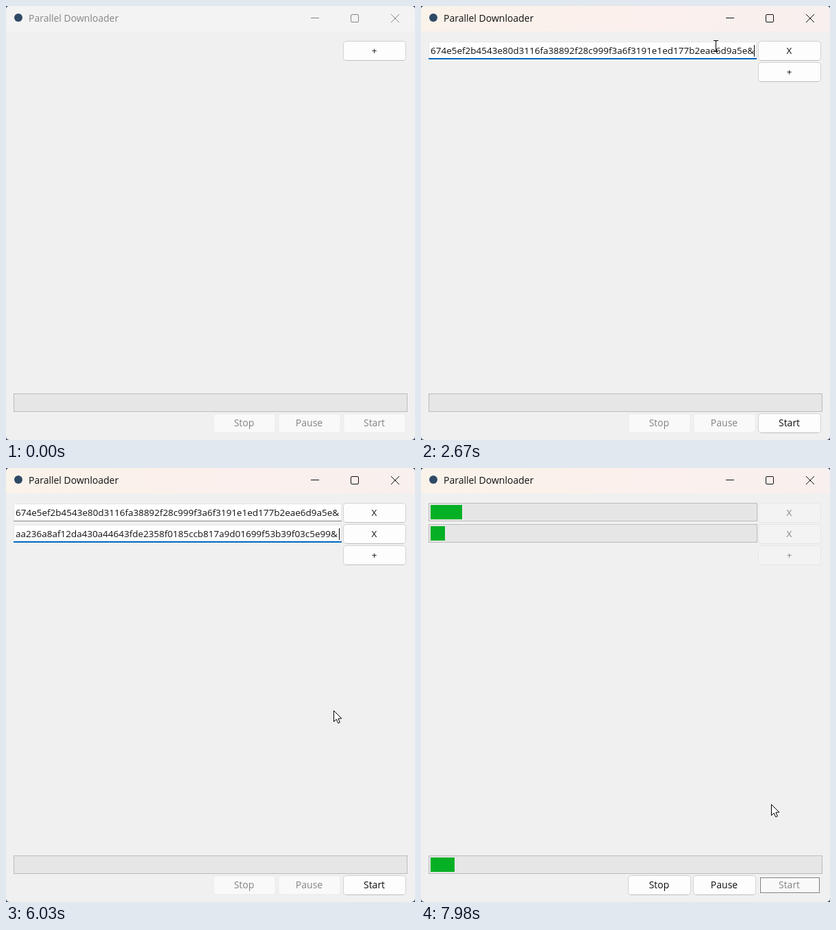
Write an HTML page with a canvas that moves like this. It is 597 px wide and 634 px high and loops after 8 s.

```html
<!DOCTYPE html>
<html lang="en">
<head>
<meta charset="utf-8">
<title>Parallel Downloader</title>
<style>
  html, body { margin: 0; width: 100%; height: 100%; overflow: hidden; background: #f0f0f0; }
  canvas { display: block; width: 597px; height: 634px; }
</style>
</head>
<body>
<canvas id="stage" width="597" height="634"></canvas>
<script>
const ctx = document.getElementById('stage').getContext('2d');
const W = 597, H = 634, LOOP = 8000;
const FONT = '"Open Sans", "Noto Sans", sans-serif';
const ROWS = [51, 82, 113];
const LINKS = [
  '674e5ef2b4543e80d3116fa38892f28c999f3a6f3191e1ed177b2eae6d9a5e&',
  'aa236a8af12da430a44643fde2358f0185ccb817a9d01699f53b39f03c5e99&'
];

// Pointer visits: [time, x, y]; the pointer is absent between them.
const VISITS = [
  [[630, 596, 80], [1190, 536, 66], [1510, 536, 66], [1630, 501, 61],
   [1800, 466, 58], [2180, 430, 58], [2670, 430, 58], [2860, 442, 220], [3050, 470, 604]],
  [[3850, 596, 104], [4200, 530, 99], [4460, 530, 99], [4710, 491, 97],
   [4960, 440, 94], [5500, 440, 94], [6030, 478, 353], [6290, 524, 565],
   [6360, 524, 565], [6600, 536, 607], [6880, 536, 607], [7150, 516, 545],
   [7500, 511, 491], [8000, 511, 491]]
];
const PRESSES = [[1380, 1500], [2210, 2340], [4300, 4440], [5000, 5130], [6690, 6810]];

const within = (t, a, b) => t >= a && t < b;

// Hermite interpolation that comes to rest beside standing segments.
function along(path, t) {
  const i = path.findIndex((p, k) => k + 1 < path.length && within(t, p[0], path[k + 1][0]));
  if (i < 0) return null;
  const [a, b] = [path[i], path[i + 1]];
  const d = b[0] - a[0], u = (t - a[0]) / d;
  const slope = (k, c) => {
    const p = path[k - 1], q = path[k], r = path[k + 1];
    if (!p || !r) return 0;
    if ((p[1] === q[1] && p[2] === q[2]) || (r[1] === q[1] && r[2] === q[2])) return 0;
    return (r[c] - p[c]) / (r[0] - p[0]);
  };
  const at = c => a[c] * (1 + 2 * u) * (1 - u) ** 2 + b[c] * u * u * (3 - 2 * u)
    + d * u * (1 - u) * (slope(i, c) * (1 - u) - slope(i + 1, c) * u);
  return { x: Math.round(at(1)), y: Math.round(at(2)) };
}

function stateAt(t) {
  const running = t >= 6830;
  let focus = '';
  if (within(t, 1380, 2210) || within(t, 4300, 5000)) focus = 'add';
  else if (within(t, 2210, 3550)) focus = 'link0';
  else if (within(t, 5000, 6690)) focus = 'link1';
  else if (t >= 6690) focus = 'start';
  return {
    running, focus,
    active: within(t, 1380, 3550) || t >= 4300,
    rows: t < 1500 ? 0 : t < 4440 ? 1 : 2,
    filled: [t >= 2670, t >= 5500],
    pointer: VISITS.map(v => along(v, t)).find(Boolean),
    pressed: PRESSES.some(p => within(t, p[0], p[1])),
    done: [Math.max(0, t - 7170) * 46 / 810, Math.max(0, t - 7300) * 21 / 680]
  };
}

function rect(x, y, w, h, fill) {
  ctx.fillStyle = fill;
  ctx.fillRect(x, y, w, h);
}

function rounded(x, y, w, h, r, fill, stroke) {
  ctx.beginPath();
  ctx.roundRect(x, y, w, h, r);
  if (fill) { ctx.fillStyle = fill; ctx.fill(); }
  if (stroke) { ctx.strokeStyle = stroke; ctx.lineWidth = 1; ctx.stroke(); }
}

function text(str, x, y, size, color, align = 'left') {
  ctx.font = `${size}px ${FONT}`;
  ctx.textAlign = align;
  ctx.fillStyle = color;
  ctx.fillText(str, x, y);
}

function line(points, color, width = 1) {
  ctx.beginPath();
  points.forEach(([x, y], i) => i ? ctx.lineTo(x, y) : ctx.moveTo(x, y));
  ctx.strokeStyle = color;
  ctx.lineWidth = width;
  ctx.stroke();
}

function titleBar(active) {
  if (active) {
    const g = ctx.createLinearGradient(0, 0, W, 0);
    g.addColorStop(0, '#faf3ea');
    g.addColorStop(0.5, '#fbf0ec');
    g.addColorStop(1, '#f8f0ee');
    rect(0, 0, W, 37, g);
  } else {
    rect(0, 0, W, 37, '#f3f3f3');
  }
  ctx.beginPath();
  ctx.arc(18, 17, 6, 0, 7);
  ctx.fillStyle = '#2f4a66';
  ctx.fill();
  text('Parallel Downloader', 33, 23, 14, active ? '#111' : '#868686');
  const ink = active ? '#111' : '#878787';
  line([[445, 17.5], [457, 17.5]], ink);
  rounded(503.5, 12.5, 11, 11, 1.5, null, ink);
  line([[562, 12], [574, 24]], ink);
  line([[574, 12], [562, 24]], ink);
}

function button(s, x, y, label, enabled, focused) {
  const p = s.pointer;
  const hover = enabled && p && p.x >= x - 1 && p.x <= x + 92 && p.y >= y && p.y < y + 29;
  if (!enabled) {
    const low = y > 500;
    rounded(x + 0.5, y + 0.5, 91, 28, 4, low ? '#f0f0f0' : '#f3f3f3', low ? '#ececec' : '#e6e6e6');
    if (low) rounded(x + 1.5, y + 1.5, 89, 26, 3, '#f9f9f9', '#f4f4f4');
  } else if (hover) {
    rounded(x + 0.5, y + 0.5, 91, 28, 4, s.pressed ? '#cce4f7' : '#e0eef9',
      s.pressed ? '#005499' : '#1683d8');
  } else {
    rounded(x + 0.5, y + 0.5, 91, 28, 4, '#fdfdfd', '#d2d2d2');
    line([[x + 4, y + 28.5], [x + 88, y + 28.5]], '#bdbdbd');
  }
  if (focused) {
    ctx.setLineDash([1, 1]);
    ctx.strokeStyle = '#000';
    ctx.lineWidth = 1;
    ctx.strokeRect(x + 3.5, y + 3.5, 86, 22);
    ctx.setLineDash([]);
  }
  text(label, x + 45.5, y + 19, label.length > 1 ? 14 : 13.5, enabled ? '#111' : '#838383', 'center');
}

function entry(y, value, focused) {
  rect(11, y + 1, 479, 26, '#e6e6e6');
  rect(12, y + 2, 477, 24, '#fff');
  if (focused) rect(11, y + 25, 479, 2, '#0067c0');
  else rect(11, y + 26, 479, 1, '#858585');
  if (value) text(value, 14, y + 19, 13.5, '#111');
  if (focused) rect(value ? 486 : 14, y + 6, 1, 17, '#000');
}

function progress(y, width, done) {
  rect(11, y, width, 27, '#bcbcbc');
  rect(12, y + 1, width - 2, 25, '#e6e6e6');
  rect(14, y + 3, Math.round(done), 21, '#06b025');
}

function pointer(s) {
  const { x, y } = s.pointer;
  if (s.pressed) {
    ctx.beginPath();
    ctx.arc(x + 0.5, y + 0.5, 14, 0, 7);
    ctx.fillStyle = 'rgba(228, 232, 0, 0.68)';
    ctx.fill();
  }
  const overEntry = !s.running && x < 491 && ROWS.slice(0, s.rows).some(r => y > r && y < r + 28);
  if (overEntry) {
    rect(x, y - 7, 1, 15, '#000');
    rect(x - 3, y - 8, 7, 1, '#000');
    rect(x - 3, y + 8, 7, 1, '#000');
    return;
  }
  const shape = [[0, 0], [0, 16], [3.8, 12.6], [6.3, 18.3], [8.9, 17.2], [6.4, 11.6], [11.4, 11.4]];
  ctx.beginPath();
  shape.forEach(([dx, dy]) => ctx.lineTo(x + 0.5 + dx, y + 0.5 + dy));
  ctx.closePath();
  ctx.fillStyle = '#fff';
  ctx.fill();
  ctx.strokeStyle = '#000';
  ctx.lineWidth = 1;
  ctx.stroke();
}

function draw(t) {
  const s = stateAt(t);
  rect(0, 0, W, H, '#35455c');
  ctx.save();
  ctx.beginPath();
  ctx.roundRect(0, 0, W, H, 5);
  ctx.clip();
  rect(0, 0, W, H, '#f0f0f0');
  titleBar(s.active);

  for (let i = 0; i < s.rows; i++) {
    const y = ROWS[i];
    if (s.running) progress(y, 480, s.done[i]);
    else entry(y, s.filled[i] ? LINKS[i] : '', s.focus === 'link' + i);
    button(s, 492, y, 'X', !s.running, false);
  }
  button(s, 492, ROWS[s.rows], '+', !s.running, s.focus === 'add');

  progress(566, 575, s.done[0] * 0.39 + s.done[1] * 0.81);
  button(s, 302, 595, 'Stop', s.running, false);
  button(s, 397, 595, 'Pause', s.running, false);
  button(s, 492, 595, 'Start', s.filled[0] && !s.running, s.focus === 'start');

  if (s.pointer) pointer(s);
  ctx.restore();
}

const begin = performance.now();
function tick() {
  draw((performance.now() - begin) % LOOP);
  requestAnimationFrame(tick);
}
tick();
</script>
</body>
</html>
```
